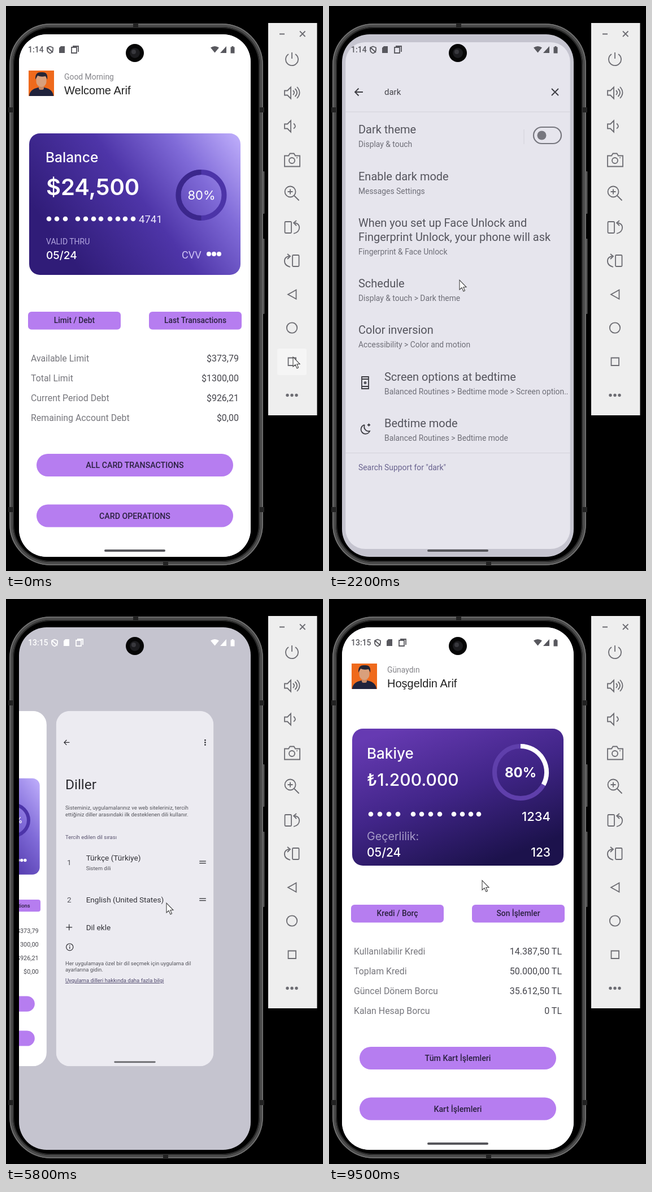
Recreate the animation shown at these times as an HTML page. Size 561 by 998 pixels, loop 9600 ms.

```html
<!DOCTYPE html>
<html lang="en">
<head>
<meta charset="utf-8">
<title>Banking app language switch</title>
<style>
html, body { margin: 0; width: 100%; height: 100%; overflow: hidden; background: #000; }
svg { display: block; width: 561px; height: 998px; font-family: Roboto, sans-serif; }
.inter { font-family: Inter, sans-serif; }
.line { fill: none; stroke: currentColor; stroke-width: 1.8; }
</style>
</head>
<body>
<svg id="stage" viewBox="0 0 561 998"></svg>
<script>
const stage = document.getElementById('stage');
const PURPLE = '#b67df0', INK = '#45454c', GREY = '#77777d';

// ---- drawing helpers; text y is the middle of the capitals ----
const text = (x, y, size, str, attrs = '') =>
  `<text x="${x}" y="${y + size * 0.355}" font-size="${size}" ${attrs}>${str}</text>`;
const rect = (x, y, w, h, r, fill, attrs = '') =>
  `<rect x="${x}" y="${y}" width="${w}" height="${h}" rx="${r}" fill="${fill}" ${attrs}/>`;
const circle = (x, y, r, fill, attrs = '') => `<circle cx="${x}" cy="${y}" r="${r}" fill="${fill}" ${attrs}/>`;
const line = (d, attrs = '') => `<path class="line" d="${d}" ${attrs}/>`;
const group = (id, body, attrs = '') => `<g id="${id}" ${attrs}>${body}</g>`;
const dots = (xs, y, r) => xs.map(x => circle(x, y, r, '#fff')).join('');
const fill = c => `fill="${c}"`;
const mid = c => `text-anchor="middle" fill="${c}"`;
const end = c => `text-anchor="end" fill="${c}"`;
const inter = (weight, c = '#fff') => `class="inter" font-weight="${weight}" fill="${c}"`;

const STRINGS = {
  en: {
    hello: 'Good Morning', welcome: 'Welcome Arif', tabs: ['Limit / Debt', 'Last Transactions'],
    rows: ['Available Limit', 'Total Limit', 'Current Period Debt', 'Remaining Account Debt'],
    all: 'ALL CARD TRANSACTIONS', ops: 'CARD OPERATIONS',
    title: 'Languages', order: 'Preferred language order', add: 'Add a language', system: 'System language',
    intro: ['Your system, apps, and websites use the first supported', 'language from your preferred languages.'],
    note: ['To select a language for each app, go to app language', 'settings.'],
    more: 'Learn more about app languages', list: ['English (United States)', 'Türkçe (Türkiye)']
  },
  tr: {
    hello: 'Günaydın', welcome: 'Hoşgeldin Arif', tabs: ['Kredi / Borç', 'Son İşlemler'],
    rows: ['Kullanılabilir Kredi', 'Toplam Kredi', 'Güncel Dönem Borcu', 'Kalan Hesap Borcu'],
    all: 'Tüm Kart İşlemleri', ops: 'Kart İşlemleri',
    title: 'Diller', order: 'Tercih edilen dil sırası', add: 'Dil ekle', system: 'Sistem dili',
    intro: ['Sisteminiz, uygulamalarınız ve web siteleriniz, tercih', 'ettiğiniz diller arasındaki ilk desteklenen dili kullanır.'],
    note: ['Her uygulamaya özel bir dil seçmek için uygulama dil', 'ayarlarına gidin.'],
    more: 'Uygulama dilleri hakkında daha fazla bilgi', list: ['Türkçe (Türkiye)', 'English (United States)']
  }
};

// ---- app screens, all in the coordinates of the full phone screen ----
const lightCard = rect(41, 225, 374, 250, 19, 'url(#light)') +
  text(70, 267, 24.5, 'Balance', inter(500)) +
  text(71, 320, 40, '$24,500', inter(600)) +
  dots([76, 90, 105, 127, 141, 155, 168, 184, 198, 211, 225], 376, 4.3) +
  text(235, 376, 18.5, '4741', fill('#f0ecff')) +
  text(71, 416, 14, 'VALID THRU', fill('#b3a6e0')) +
  text(71, 440, 19, '05/24', inter(500)) +
  circle(345.5, 334, 40.5, 'none', 'stroke="#4c34a8" stroke-width="9"') +
  `<path d="M345.500 374.500a40.500 40.500 0 0 1 0-81" fill="none" stroke="#3b278c" stroke-width="9"/>` +
  text(346, 334, 22, '80%', 'text-anchor="middle" ' + inter(400)) +
  text(311, 440, 18, 'CVV', fill('#cfc4f5')) + dots([359, 368, 377], 438, 4);

const darkCard = rect(41, 229, 374, 242, 19, 'url(#dark)') +
  text(67, 273, 26, 'Bakiye', inter(500)) +
  text(67, 319, 30, '₺1.200.000', inter(500)) +
  dots([74, 90, 106, 122, 149, 164, 180, 196, 221, 236, 251, 265], 380, 4.3) +
  text(392, 384, 22, '1234', 'text-anchor="end" ' + inter(500)) +
  text(67, 419, 19.7, 'Geçerlilik:', inter(400, '#a79cc9')) +
  text(67, 448, 21, '05/24', inter(500)) +
  text(392, 448, 21, '123', 'text-anchor="end" ' + inter(500)) +
  circle(339, 306, 46, 'none', 'stroke="#5f3fab" stroke-width="8"') +
  `<path d="M339 260a46 46 0 0 1 40.500 68" fill="none" stroke="#fff" stroke-width="8"/>` +
  text(339, 306, 24, '80%', 'text-anchor="middle" ' + inter(700));

const avatar = rect(40, 114, 45, 45, 0, '#ef6a1c') +
  '<path d="M41 159q1-12 16-15h11q15 3 16 15z" fill="#20233c"/>' +
  rect(58, 137, 9, 11, 3, '#c48a68') + rect(53.5, 119, 18, 24, 9, '#d9a07c') +
  '<path d="M52 130q-1-14 11-13 12-1 10 13l-3-6q-8 2-14-1z" fill="#252433"/>';

const values = list => list.map((v, i) => text(412, 622 + i * 35, 16, v, end(INK))).join('');

function home(lang) {
  const s = STRINGS[lang];
  const tab = (x, label) => rect(x, 540, 164, 31.5, 6, PURPLE) +
    text(x + 82, 555.5, 13.8, label, mid('#2b2140') + ' font-weight="500"');
  const pill = (y, label) => rect(54, y, 348, 40, 20, PURPLE) +
    text(228, y + 20, 14.2, label, mid('#2b2140') + ' font-weight="500"');
  const account1 = values(['$373,79', '$1300,00', '$926,21', '$0,00']);
  const cards = lang === 'en' ? lightCard + account1 :
    `<g clip-path="url(#pagerClip)">${group('pager', lightCard + `<g transform="translate(390)">${darkCard}</g>`)}</g>` +
    group('account1', account1) +
    group('account2', values(['14.387,50 TL', '50.000,00 TL', '35.612,50 TL', '0 TL']));
  return rect(23, 50, 410, 923, 0, '#fff') + avatar +
    text(103, 125, 13.9, s.hello, fill('#85858a')) +
    text(103, 149, 20, s.welcome, 'fill="#222" font-family="Liberation Sans, sans-serif"') +
    cards + tab(39, s.tabs[0]) + tab(253, s.tabs[1]) +
    s.rows.map((r, i) => text(44, 622 + i * 35, 15.9, r, fill(GREY))).join('') +
    pill(791, s.all) + pill(880.5, s.ops);
}

const imageButton = rect(58.5, 387, 70.5, 70.5, 19, '#6079a9') +
  `<g color="#fff">${line('M79 407h30v30h-30z', 'stroke-width="3.500"')}</g><path d="M82 432l7-9 5 6 7-9 8 12z" fill="#fff"/>`;

function settings() {
  const item = (x, y, title, sub) => text(x, y, 20, title, fill('#55555d')) + text(x, y + 26, 13.9, sub, fill('#6f6f78'));
  return rect(23, 50, 410, 923, 0, '#e6e5ed') +
    `<g color="#3c3c42" transform="translate(228 512) scale(1.031) translate(-228 -512)">` +
    line('M60 152H46m6.500-6.500l-6.500 6.500 6.500 6.500M394 146l12 12m0-12l-12 12') +
    text(98, 152, 15, 'dark', fill('#44444a')) +
    line('M28 187H427M28 789.500H427M345 218v26', 'style="stroke:#d2d1da;stroke-width:1"') +
    rect(362, 214, 49, 29, 14.5, 'none', 'stroke="#77777f" stroke-width="2.200"') + circle(376.5, 228.5, 8, '#77777f') +
    item(52, 218, 'Dark theme', 'Display &amp; touch') +
    item(52, 301, 'Enable dark mode', 'Messages Settings') +
    text(52, 383, 20, 'When you set up Face Unlock and', fill('#55555d')) +
    item(52, 408, 'Fingerprint Unlock, your phone will ask', 'Fingerprint &amp; Face Unlock') +
    item(52, 490, 'Schedule', 'Display &amp; touch &gt; Dark theme') +
    item(52, 572, 'Color inversion', 'Accessibility &gt; Color and motion') +
    item(98, 655, 'Screen options at bedtime', 'Balanced Routines &gt; Bedtime mode &gt; Screen option..') +
    item(98, 737, 'Bedtime mode', 'Balanced Routines &gt; Bedtime mode') +
    line('M58 655h12v21H58zM58 659h12M58 672h12') + circle(64, 665.5, 2.5, '#55555d') +
    line('M63 740a8 8 0 1 0 9 11a8 8 0 0 1-9-11M68 740h5M70.500 737.500v5') +
    text(52, 815, 13.9, 'Search Support for "dark"', fill('#69638f')) + '</g>';
}

function languages(lang) {
  const s = STRINGS[lang];
  const small = (y, str, c = '#55555c') => text(47, y, 14, str, fill(c));
  const row = (n, y, label) => text(57, y, 20, n, mid('#55555c')) +
    line(`M396 ${y - 2.5}h17M396 ${y + 2.5}h17`);
  return rect(23, 50, 410, 923, 0, '#ecebf1') + '<g color="#2c2c31">' +
    line('M58 132H44m6.500-6.500l-6.500 6.500 6.500 6.500') +
    [126, 132, 138].map(y => circle(411, y, 2, '#2c2c31')).join('') +
    text(47, 240, 36, s.title, fill('#2c2c31')) +
    s.intro.map((l, i) => small(302 + i * 16.5, l)).join('') + small(378, s.order, '#5a5470') +
    row(1, 443) + text(101, 432, 20, s.list[0], fill('#333339')) + text(101, 459, 14, s.system, fill('#55555c')) +
    row(2, 540) + text(101, 540, 20, s.list[1], fill('#333339')) +
    line('M49 612h16M57 604v16') + text(101, 612, 20, s.add, fill('#333339')) +
    circle(58.5, 663.5, 9, 'none', 'class="line"') + line('M58.500 662v6M58.500 658v2') +
    s.note.map((l, i) => small(706 + i * 16.5, l)).join('') +
    text(47, 750, 14, s.more, 'fill="#4d466b" text-decoration="underline"') +
    rect(174, 960, 108, 4, 2, '#66666b') + '</g>';
}

const dialog = rect(23, 50, 410, 923, 0, '#000', 'opacity=".6"') +
  rect(46, 396, 364, 276, 20, '#000', 'opacity=".15"') + rect(49, 390, 358, 274, 19, '#e6e5ee') +
  `<g color="#77736f">${circle(228, 431, 12.5, 'none', 'class="line"')}${line(
    'M215.500 431h25M217.500 425h21M217.500 437h21M228 418.500c-8 7-8 18 0 25c8-7 8-18 0-25')}</g>` +
  text(228, 477, 20, 'Change system language to', mid('#333339')) +
  text(228, 500, 20, 'Türkçe (Türkiye) ?', mid('#333339')) +
  text(73, 541, 15.9, 'Your device settings and regional', fill('#55555c')) +
  text(73, 560, 15.9, 'preferences will change.', fill('#55555c')) +
  text(269, 633, 14.2, 'Cancel', 'fill="#565174" font-weight="500"') +
  text(335, 633, 14.2, 'Change', 'fill="#565174" font-weight="500"');

const redApp = rect(23, 50, 410, 923, 0, '#fbf5fd') + rect(23, 50, 410, 65, 0, '#cb2026') +
  rect(335, 416, 72, 31, 8, '#cb2026') + text(392, 431, 14, 'Biber', end('#fff') + ' font-weight="700"') +
  text(368, 579, 14, 'Acılı', end('#666')) +
  rect(54, 909, 348, 40, 20, '#cb2026') + text(379, 929, 18, 'EKLE', end('#fff') + ' font-weight="700"');

// ---- system chrome ----
const gearIcon = circle(0, 0, 20, '#4f7fe8') + [0, 45, 90, 135].map(a =>
  rect(-3, -13, 6, 26, 2, '#fff', `transform="rotate(${a})"`)).join('') + circle(0, 0, 10, '#fff') + circle(0, 0, 4.5, '#4f7fe8');
const walletIcon = circle(0, 0, 20, '#f5effc') + rect(-13, -13, 24, 26, 3, '#b37cf0') +
  rect(-1, -7, 16, 14, 3, '#b37cf0', 'stroke="#f5effc" stroke-width="2.500"') + circle(6, 0, 2.5, '#fff');

const action = (x, label, labelX, dashed) => line(dashed
  ? `M${x} 867h15v12h-15z` : `M${x} 870v-4h4m4 0h4v4m0 6v4h-4m-4 0h-4v-4`, dashed ? 'stroke-dasharray="3 2"' : '') +
  (dashed ? `<path d="M${x + 8} 873l9 3-4 2-2 4z" fill="currentColor"/>` : '') + text(labelX, 873.5, 14, label, fill('#44444b'));

const statusLeft = line('M78 71.500l5 2v4q0 4-5 6q-5-2-5-6v-4zM73 73l10 9') +
  '<path d="M97 71h7v12h-10v-9z" fill="currentColor"/>' + line('M116 73h9v10h-9zM118 71h10v10');
const statusBar = group('clock', '') + group('statusLeft', statusLeft) +
  '<path d="M362 73.500q7.500-5 15 0l-7.500 9zM379 83h11v-12zM397.500 72.500h2v-1.500h3v1.500h2v11h-7z" fill="currentColor"/>';

const phone = rect(9, 34, 443, 951, 70, '#000', 'stroke="#4b4b4b" stroke-width="6"') +
  rect(7, 32, 447, 955, 72, 'none', 'stroke="#777" stroke-width="1.500"') +
  rect(13, 38, 435, 943, 66, 'none', 'stroke="#2c2c2c" stroke-width="2"') +
  [[225, 30, 9, 8], [278, 982, 9, 7], [4, 179, 8, 9], [449, 179, 8, 9], [4, 885, 8, 9], [449, 885, 8, 9]]
    .map(([x, y, w, h]) => rect(x, y, w, h, 0, '#222')).join('') +
  rect(454.5, 292, 3, 75, 1, '#555') + rect(454.5, 411, 3, 133, 1, '#555');

const rotateIcon = rect(493.5, 381, 11.5, 20, 1.5, 'none', 'class="line"') +
  line('M509 402q11-3 10-12q-1-6-8-7M514 379l-5 4 5 5');
const toolbar = rect(464, 30, 86.5, 693, 0, '#eeeeee') + group('hover', rect(480, 605, 52, 47, 3, '#f5f5f5')) +
  '<g color="#6c6c72">' + line('M484 49.500h9M520 44.500l9.500 9.500m0-9.500l-9.500 9.500') +
  line('M500 85a11 11 0 1 0 12 0M506 82v11') +
  line('M493 149.500h5l6-6v20l-6-6h-5zM508 149q4 4 0 8M511.500 146q7 7 0 14M515 143q9 10 0 20') +
  line('M493 208.500h5l6-6v20l-6-6h-5zM509 207.500q6 5 0 9') +
  line('M493 264.500h7l2.500-4h7l2.500 4h8v19h-27z') + circle(506, 273, 5, 'none', 'class="line"') + circle(515, 268, 1, '#6c6c72') +
  circle(503, 328, 9.5, 'none', 'class="line"') + line('M510 335l8.500 8.500M498.500 328h9M503 323.500v9') +
  rotateIcon + `<g transform="translate(1012 59) scale(-1 1)">${rotateIcon}</g>` +
  line('M513.500 501.500v16l-14.500-8z') + circle(506, 568.5, 9.2, 'none', 'class="line"') + line('M499.500 621.500h13.500v13.500h-13.500z') +
  [498, 506, 514].map(x => circle(x, 687.5, 2.7, '#6c6c72')).join('') + '</g>';

const screen = (id, body) => group(id, body, 'clip-path="url(#cardClip)"');

stage.innerHTML = `<defs>
  <clipPath id="screenClip">${rect(23, 50, 410, 923, 49, '#fff')}</clipPath>
  <clipPath id="cardClip">${rect(23, 50, 410, 923, 36, '#fff')}</clipPath>
  <clipPath id="pagerClip">${rect(41, 220, 375, 260, 0, '#fff')}</clipPath>
  <linearGradient id="light" gradientUnits="userSpaceOnUse" x1="110" y1="440" x2="400" y2="225">
    <stop offset="0" stop-color="#301c78"/><stop offset=".45" stop-color="#4e35a8"/>
    <stop offset=".75" stop-color="#806bd8"/><stop offset="1" stop-color="#b9a8f8"/></linearGradient>
  <linearGradient id="dark" gradientUnits="userSpaceOnUse" x1="150" y1="215" x2="250" y2="480">
    <stop offset="0" stop-color="#663ab2"/><stop offset=".5" stop-color="#412588"/><stop offset="1" stop-color="#1c124c"/></linearGradient>
</defs>` + rect(0, 0, 561, 998, 0, '#000') + phone +
  `<g clip-path="url(#screenClip)">` + rect(23, 50, 410, 923, 0, '#c5c4cf') +
  screen('red', redApp) +
  screen('settings', settings()) +
  screen('home', group('homeEn', home('en')) + group('homeTr', home('tr')) + group('imageButton', imageButton)) +
  screen('languages', group('langEn', languages('en')) + group('langTr', languages('tr'))) +
  group('icons', group('gear', gearIcon) + group('wallet', walletIcon)) +
  group('actions', group('actionsEn', action(119, 'Screenshot', 143) + action(277, 'Select', 302, true)) +
    group('actionsTr', action(105, 'Ekran görüntüsü', 130) + action(293, 'Seç', 325, true)), 'color="#44444b"') +
  group('dialog', dialog) + group('status', statusBar) +
  group('handle', rect(174, 960, 108, 4, 2, 'currentColor')) + '</g>' +
  circle(228, 83, 16, '#060606') + circle(228, 83, 9, '#1c1c1f') + circle(226, 81, 4, '#38383d') +
  toolbar + group('cursor', '<path d="M0 0V17L4 13.500L7 20L9.500 18.800L6.800 12.500H12Z" fill="#fff" stroke="#444" stroke-width="1.100"/>');

// ---- motion, on a clock of 100 ms steps ----
const LOOP = 9600, STEP = 100, PITCH = 295.5;
const at = (f, keys) => {
  const i = keys.findIndex(k => k[0] > f);
  if (i < 0) return keys[keys.length - 1].slice(1);
  if (i === 0) return keys[0].slice(1);
  const a = keys[i - 1], b = keys[i], u = (f - a[0]) / (b[0] - a[0]);
  return a.slice(1).map((v, j) => v + (b[j + 1] - v) * u);
};
const shrinkKeys = [[2, 0], [5, 1], [20, 1], [21, .5], [22, .094], [23, 0], [54, 0], [57, 1], [74, 1], [76, .2], [77, 0]];
const scrollKeys = [[10, 0], [12, -.48], [15, -1], [25, -1], [26, 0], [64, 0], [69, -1]];
const iconKeys = [[3, 0], [6, 1], [20, 1], [21, 0], [58, 0], [61, 1], [74, 1], [75, 0]];
const cursorKeys = [[0, 508, 620], [10, 508, 620], [11, 260, 526], [12, 327, 526], [15, 400, 520], [20, 231, 484],
  [23, 231, 484], [25, 503, 506], [30, 503, 506], [31, 404, 538], [34, 381, 428], [36, 381, 428], [39, 352, 630],
  [43, 352, 630], [50, 506, 618], [51, 508, 620], [55, 508, 620], [58, 284, 537], [63, 284, 537], [64, 180, 510],
  [69, 375, 505], [70, 273, 489], [86, 273, 489], [89, 350, 314], [94, 116, 314], [95, 271, 497]];

const el = id => document.getElementById(id);
const show = (id, on) => el(id).style.display = on ? '' : 'none';
const move = (id, x, y = 0) => el(id).setAttribute('transform', `translate(${x} ${y})`);

function draw(f) {
  const [shrink] = at(f, shrinkKeys), [scroll] = at(f, scrollKeys);
  const scale = 1 - .32 * shrink, turkish = f >= 41, dimmed = f >= 33 && f < 41;
  const slots = f < 26 ? { settings: -1, home: 0 } : { red: -2, home: -1, languages: 0 };
  const centre = id => 228 + (slots[id] - scroll) * PITCH * scale / .68;
  for (const id of ['red', 'settings', 'home', 'languages']) {
    show(id, id in slots);
    if (id in slots) el(id).setAttribute('transform',
      `translate(${centre(id)} 511.500) scale(${scale}) translate(-228 -511.500)`);
  }
  show('homeEn', f < 79);
  show('homeTr', f >= 79);
  show('imageButton', f >= 8 && f <= 20);
  show('langEn', !turkish);
  show('langTr', turkish);
  const [swipe] = at(f, [[89, 0], [93, -390]]);
  move('pager', swipe);
  show('account1', swipe > -195);
  show('account2', swipe <= -195);

  const [icons] = at(f, iconKeys);
  el('icons').style.opacity = icons;
  move('gear', centre('settings' in slots ? 'settings' : 'languages'), 157);
  move('wallet', centre('home'), 157);
  el('actions').style.opacity = icons * Math.max(0, 1 - 1.6 * Math.abs(scroll - Math.round(scroll)));
  show('actionsEn', !turkish);
  show('actionsTr', turkish);
  show('dialog', dimmed);
  el('dialog').style.opacity = f === 33 ? .5 : 1;

  const opening = f >= 55 && f < 60;
  el('status').setAttribute('color', dimmed || opening ? '#fff' : '#58585e');
  el('handle').setAttribute('color', dimmed ? '#fff' : '#56565b');
  show('handle', !opening);
  const time = f < 27 ? '1:14' : turkish ? '13:15' : '1:15';
  el('clock').innerHTML = text(39, 77, 14, time, 'fill="currentColor" font-weight="500"');
  move('statusLeft', turkish ? 8 : 0);
  show('hover', f <= 10 || (f >= 51 && f <= 55));
  move('cursor', ...at(f, cursorKeys));
}

let last = -1;
function tick() {
  const f = Math.floor(performance.now() % LOOP / STEP);
  if (f !== last) draw(last = f);
  requestAnimationFrame(tick);
}
tick();
</script>
</body>
</html>
```
